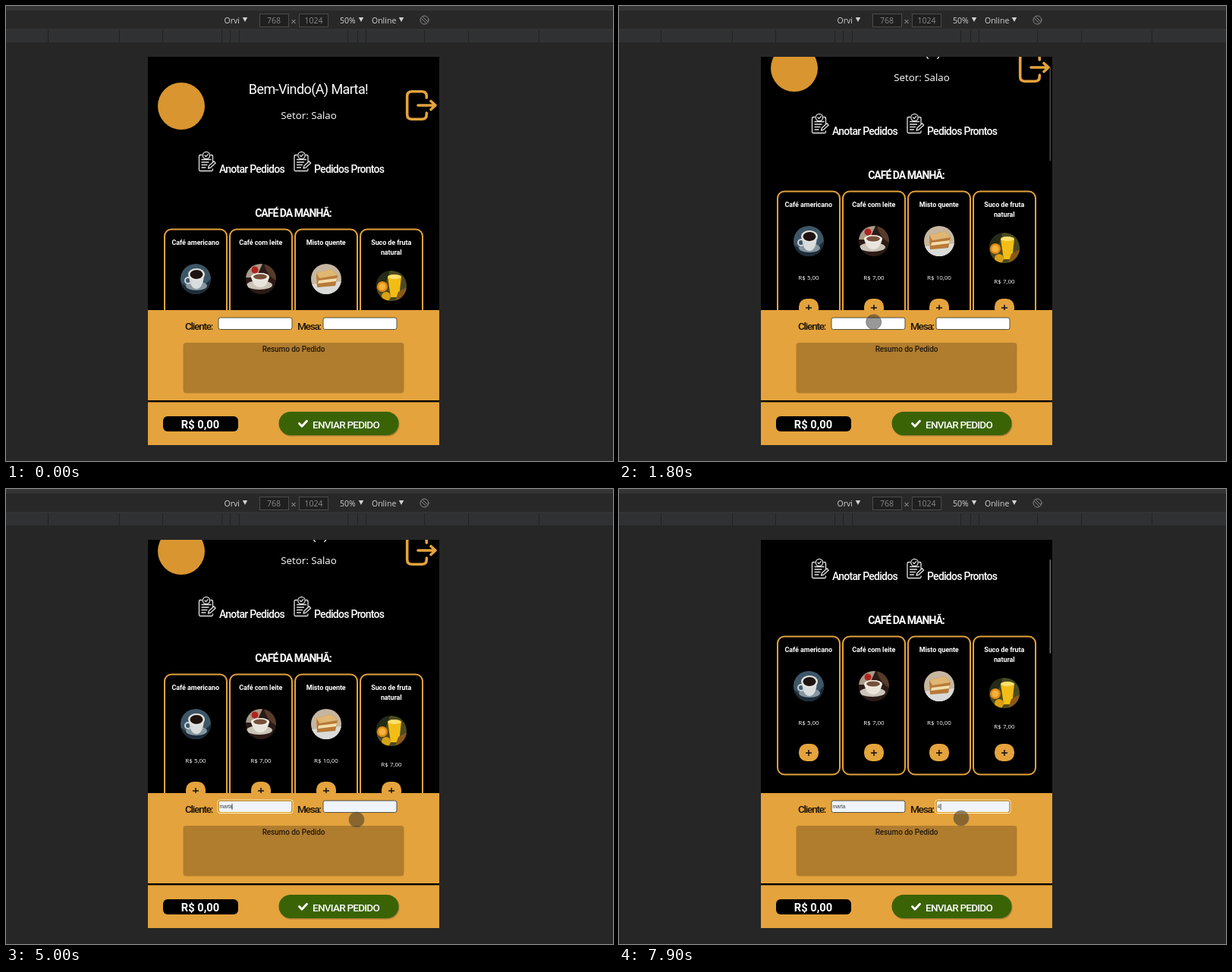
Recreate the animation shown at these times as an HTML page. Size 800 px wide and 600 px high, loop 8 s.

```html
<!DOCTYPE html>
<html lang="pt">
<head>
<meta charset="utf-8">
<title>Pedidos</title>
<style>
  html, body { margin: 0; width: 100%; height: 100%; overflow: hidden; background: #262626; }
  svg { display: block; width: 800px; height: 600px; }
  text { white-space: pre; }
  .bar { font: 10.5px "Open Sans", sans-serif; fill: #d2d2d2; }
  .dim { fill: #8a8a8a; text-anchor: middle; }
  .cond { font-family: Roboto, sans-serif; font-weight: 500; fill: #fff; }
  .mid { text-anchor: middle; }
  .hello { font-size: 18px; font-weight: 400; letter-spacing: -.6px; }
  .sector { font: 13.33px "Open Sans", sans-serif; fill: #fff; }
  .nav { font-size: 14px; letter-spacing: -.75px; }
  .head { font-size: 14px; font-weight: 700; letter-spacing: -1px; }
  .item { font-size: 9px; font-weight: 700; letter-spacing: -.1px; }
  .price { font: 8px "Open Sans", sans-serif; fill: #fff; }
  .label { font-size: 13.5px; letter-spacing: -1.2px; fill: #1c1408; }
  .sum { font-size: 10px; letter-spacing: -.1px; fill: #241a0c; }
  .total { font-size: 14.7px; font-weight: 700; }
  .send { font-size: 13.5px; letter-spacing: -.75px; }
  .typed { font: 6.67px "Liberation Sans", Arial, sans-serif; fill: #3c3c3c; }
  .menu text { font: 600 12px "Open Sans", sans-serif; fill: #f0f0f0; }
  .line { fill: none; stroke-linecap: round; stroke-linejoin: round; }
</style>
</head>
<body>
<svg viewBox="0 0 800 600">
  <defs>
    <clipPath id="view"><rect x="187" y="67" width="384" height="334"/></clipPath>
    <clipPath id="disc"><circle r="20"/></clipPath>
    <g id="note" class="line" stroke="#e4e4e4" stroke-width="1.3">
      <path d="M258 196.5h-2q-1.5 0-1.5 1.5v18q0 1.500 1.500 1.500h15q1.500 0 1.500-1.500v-1M270 196.500h1q1.500 0 1.500 1.500v7"/>
      <circle cx="264" cy="197" r="4.700"/>
      <path d="M262 197l1.500 1.600 2.700-3M258 202.500h12M258 206h9M258 209.500h7M258 213h5"/>
      <path d="M266.500 214l1-3.200 6.500-6 2.200 2.300-6.500 6z"/>
    </g>
  </defs>

  <rect width="800" height="600" fill="#262626"/>
  <rect width="800" height="6" fill="#353535"/>
  <rect y="6" width="800" height="25" fill="#282828"/>
  <rect y="31" width="800" height="17" fill="#303133"/>
  <path d="M0 31h800" stroke="#3a3a3a"/>
  <path d="M55.500 32v16M149.500 32v16M206.500 32v16M284.500 32v16M295.500 32v16M307.500 32v16M450.500 32v16M463.500 32v16M474.500 32v16M551.500 32v16M609.500 32v16M702.500 32v16" stroke="#222"/>
  <g class="bar">
    <text x="287.500" y="23">Orvi</text>
    <text x="440" y="23">50%</text>
    <text x="482" y="23">Online</text>
    <g fill="#1f1f1f" stroke="#4b4b4b">
      <rect x="334.500" y="10.500" width="38" height="17"/>
      <rect x="386.500" y="10.500" width="38" height="17"/>
    </g>
    <text class="dim" x="353" y="23">768</text>
    <text class="dim" x="405.500" y="23">1024</text>
    <path d="M376.500 18l5 5m0-5l-5 5" stroke="#a8a8a8"/>
    <path d="M311.800 15h6.400l-3.200 6zM464.800 15h6.400l-3.200 6zM517.800 15h6.400l-3.200 6z"/>
  </g>
  <g class="line" stroke="#8d8d8d">
    <circle cx="551.500" cy="18.500" r="5.500"/>
    <path d="M547.700 16.500l5.800 5.800M549.600 14.600l5.800 5.800"/>
  </g>

  <rect x="187" y="67" width="384" height="512"/>
  <g clip-path="url(#view)">
    <g id="page">
      <circle cx="231" cy="132" r="31" fill="#d9952f"/>
      <text class="cond mid hello" x="398.500" y="116">Bem-Vindo(A) Marta!</text>
      <text class="sector mid" x="399" y="149">Setor: Salao</text>
      <path class="line" stroke="#e4a33c" stroke-width="3.600" d="M554.300 121v-2q0-6.300-6.300-6.300h-13q-6.300 0-6.300 6.300v24q0 6.300 6.300 6.300h13q6.300 0 6.300-6.300v-2M543 131h23M560 125.500l6 5.500-6 5.500"/>
      <use href="#note"/>
      <use href="#note" x="125.500"/>
      <text class="cond nav" x="281" y="220">Anotar Pedidos</text>
      <text class="cond nav" x="406" y="220">Pedidos Prontos</text>
      <text class="cond mid head" x="378.500" y="278">CAFÉ DA MANHÃ:</text>
      <g id="cards"></g>
    </g>
  </g>
  <rect id="thumb" x="567.500" width="1.800" height="124" rx=".9" fill="#666"/>

  <rect x="187" y="401" width="384" height="178" fill="#e4a33c"/>
  <rect x="187" y="520" width="384" height="2.400"/>
  <text class="cond label" x="236" y="427">Cliente:</text>
  <text class="cond label" x="384" y="427">Mesa:</text>
  <rect x="233.500" y="444" width="291" height="66.500" rx="4" fill="#b07c2e"/>
  <text class="cond mid sum" x="379" y="456">Resumo do Pedido</text>
  <rect x="207" y="541" width="99" height="20" rx="6"/>
  <text class="cond mid total" x="256" y="557">R$ 0,00</text>
  <rect x="360.500" y="536" width="158" height="31.500" rx="15.700" fill="#a97f38"/>
  <rect x="359.500" y="535" width="158" height="31" rx="15.500" fill="#3a6306"/>
  <path class="line" d="M386.500 550.500l3.500 3.700 6.500-7" stroke="#fff" stroke-width="2.800"/>
  <text class="cond send" x="404" y="556.500">ENVIAR PEDIDO</text>
  <g id="fields"></g>

  <g id="names" class="menu"></g>
  <g id="tables" class="menu"></g>
  <circle id="touch" r="10" fill="rgba(30,30,30,.46)" stroke="rgba(95,95,95,.6)"/>
  <path id="arrow" d="M0 0v16.500l3.800-3.500 2.700 6.200 2.500-1.100-2.700-6.100h5.200z" fill="#fff" stroke="#111" stroke-width=".9"/>
</svg>
<script>
const $ = id => document.getElementById(id);
const show = (el, on) => el.setAttribute('visibility', on ? 'visible' : 'hidden');
const within = (t, a, b) => t >= a && t < b;

const photos = [
  `<rect x="-20" y="-20" width="40" height="40" fill="#3d5667"/>
   <path d="M-20 4Q0 22 20 0V20H-20z" fill="#1d2c38"/>
   <ellipse cx="1" cy="9" rx="14" ry="6" fill="#8496a0"/>
   <path d="M-9 -6Q-8 13 1 13T11 -6z" fill="#d9dcdc"/>
   <circle cx="-10" cy="2" r="4" fill="none" stroke="#d0d4d5" stroke-width="2"/>
   <ellipse cx="1" cy="-6" rx="11" ry="8" fill="#e4e3df"/>
   <ellipse cx="1" cy="-6" rx="8.500" ry="6" fill="#1d120d"/>`,
  `<rect x="-20" y="-20" width="40" height="40" fill="#2b1b17"/>
   <path d="M-20 -20H2L-6 -2H-20z" fill="#a99a89"/>
   <circle cx="-8" cy="-12" r="4.500" fill="#b3231d"/>
   <path d="M4 -20H20V2Q8 -4 4 -20z" fill="#573a2a"/>
   <ellipse cx="-2" cy="8" rx="17" ry="6" fill="#cbc4b8"/>
   <path d="M-13 -3Q-10 11 -1 11T11 -3z" fill="#e9e5dd"/>
   <ellipse cx="-1" cy="-3" rx="12" ry="5" fill="#f3eee5"/>
   <ellipse cx="-1" cy="-3" rx="9" ry="3.500" fill="#75503a"/>`,
  `<rect x="-20" y="-20" width="40" height="40" fill="#c6b6a0"/>
   <path d="M-20 7L20 3V20H-20z" fill="#d9dbd9"/>
   <path d="M-13 -8L7 -13 15 -5 12 9 -12 11z" fill="#b87a38"/>
   <path d="M-13 -8L7 -13 15 -5 -9 -1z" fill="#e0b673"/>
   <path d="M-10 2L14 -1 13 3 -11 6z" fill="#f2dfac"/>`,
  `<rect x="-20" y="-20" width="40" height="40" fill="#4b4a20"/>
   <path d="M-20 -20H-2L-9 0H-20z" fill="#242b17"/>
   <path d="M-5 -12H13L10 15H-1z" fill="#f2bd15"/>
   <ellipse cx="4" cy="-12" rx="9" ry="3" fill="#ffe06b"/>
   <circle cx="-12" cy="1" r="7" fill="#e48a12"/>
   <circle cx="-12" cy="1" r="4.500" fill="#f5b23d"/>
   <circle cx="-7" cy="14" r="6" fill="#d9a115"/>
   <path d="M9 8L20 2V20H5z" fill="#8a5a17"/>`
];
const items = [
  [['Café americano'], '5,00'],
  [['Café com leite'], '7,00'],
  [['Misto quente'], '10,00'],
  [['Suco de fruta', 'natural'], '7,00']
];
$('cards').innerHTML = items.map(([title, price], i) => {
  const x = 250 + 86 * i, two = title.length > 1;
  const lines = title.map((s, k) =>
    `<text class="cond mid item" x="${x - .3}" y="${315 + 13 * k}">${s}</text>`).join('');
  return `<rect x="${x - 41}" y="294.500" width="82" height="182" rx="9" fill="#000" stroke="#e4a33c" stroke-width="2"/>
    ${lines}
    <g transform="translate(${x} ${two ? 369 : 360})" clip-path="url(#disc)">${photos[i]}</g>
    <text class="price mid" x="${x}" y="${two ? 416 : 411}">R$ ${price}</text>
    <rect x="${x - 13}" y="436" width="26" height="23" rx="10.500" fill="#e4a33c"/>
    <path d="M${x - 4} 448h8M${x} 444v8" stroke="#111" stroke-width="1.500"/>`;
}).join('');

function makeField(x) {
  const g = document.createElementNS('http://www.w3.org/2000/svg', 'g');
  g.innerHTML = `<rect x="${x}" y="411" width="97" height="15.500" rx="2.500" fill="#fff" stroke="#55503f"/>
    <g><rect x="${x - 1}" y="410" width="99" height="17.500" rx="3" fill="none" stroke="#fff3d6"/>
    <rect x="${x}" y="411" width="97" height="15.500" rx="2" fill="none" stroke="#e59a10"/></g>
    <text class="typed" x="${x + 1.500}" y="421"></text>
    <path stroke="#222" stroke-width=".8"/>`;
  $('fields').append(g);
  const [box, ring, text, caret] = g.children;
  return (value, filled, focus, caretX) => {
    box.setAttribute('fill', filled ? '#eff4fb' : '#fff');
    show(ring, focus);
    text.textContent = value;
    show(caret, caretX);
    caret.setAttribute('d', `M${caretX || 0} 415v8`);
  };
}
const client = makeField(280), table = makeField(418);

function makeMenu(id, x, rows) {
  $(id).innerHTML = `<path d="M${x} 600V412q0-4 4-4h187q4 0 4 4V600z" fill="#27282b"/>
    <rect class="hover" x="${x}" width="195" height="36" fill="#4a4b4e"/>` +
    rows.map((s, i) => `<text x="${x + 12}" y="${438.500 + 36 * i}">${s}</text>`).join('');
}
const fullName = 'MARTA GOVALIN TELMIRO';
makeMenu('names', 372, [fullName, 'marta', 'Grelhar Zulo Teste', 'rwerrwr', 'uihuih']);
makeMenu('tables', 649, ['4', '2', '1', '3', '5']);
const hover = $('names').querySelector('.hover');
show($('tables').querySelector('.hover'), false);

// Piecewise linear track: rows of [time, ...values].
function track(keys, t) {
  const n = keys.findIndex(k => k[0] > t);
  if (n < 0) return keys[keys.length - 1].slice(1);
  if (n === 0) return keys[0].slice(1);
  const a = keys[n - 1], b = keys[n], p = (t - a[0]) / (b[0] - a[0]);
  return a.slice(1).map((v, i) => v + (b[i + 1] - v) * p);
}
const scrollKeys = [[600, 0], [1100, 44], [1200, 50], [7400, 50], [7900, 100]];
const touchKeys = [
  [600, 364, 360], [1100, 364, 316], [1200, 364, 310], [1300, 364, 310],
  [1900, 330, 438], [2100, 322, 416], [3800, 322, 416], [4000, 367, 428],
  [4600, 388, 462], [5000, 462, 436], [5200, 463, 420], [7400, 463, 420], [7900, 451, 434]
];
const arrowKeys = [[4200, 383, 445], [4300, 386, 459], [4400, 388, 464]];

function draw(t) {
  const [scroll] = track(scrollKeys, t);
  $('page').setAttribute('transform', `translate(0 ${-scroll})`);
  $('thumb').setAttribute('y', 68 + scroll * .25);
  const [alpha] = track([[600, 0], [700, 1], [1700, 1], [2000, 0], [7400, 0], [7500, 1]], t);
  $('thumb').setAttribute('opacity', alpha);

  const open = within(t, 2400, 4600), hovering = within(t, 4200, 4600);
  show($('names'), open);
  show(hover, hovering);
  hover.setAttribute('y', t < 4300 ? 416 : 452);
  show($('tables'), within(t, 5500, 6900));

  const name = t < 4200 ? '' : t < 4300 ? fullName : 'marta';
  const waiting = within(t, 2400, 2900) || within(t, 3300, 3800);
  client(name, t >= 4200, within(t, 2400, 5400),
    waiting ? 282 : within(t, 4600, 5100) ? 298 : 0);
  const blink = within(t, 5400, 5900) || within(t, 6400, 6900);
  table(t < 6900 ? '' : '4', t >= 4600, t >= 5400,
    blink ? 420 : within(t, 6900, 7400) || t >= 7900 ? 424 : 0);

  show($('touch'), within(t, 600, 3800) || within(t, 4000, 4200) || t >= 4600);
  $('touch').setAttribute('transform', `translate(${track(touchKeys, t)})`);
  show($('arrow'), hovering);
  $('arrow').setAttribute('transform', `translate(${track(arrowKeys, t)})`);
}

const start = performance.now();
function loop() {
  const t = (performance.now() - start) % 8000;
  draw(Math.floor(t / 100) * 100);
  requestAnimationFrame(loop);
}
loop();
</script>
</body>
</html>
```
